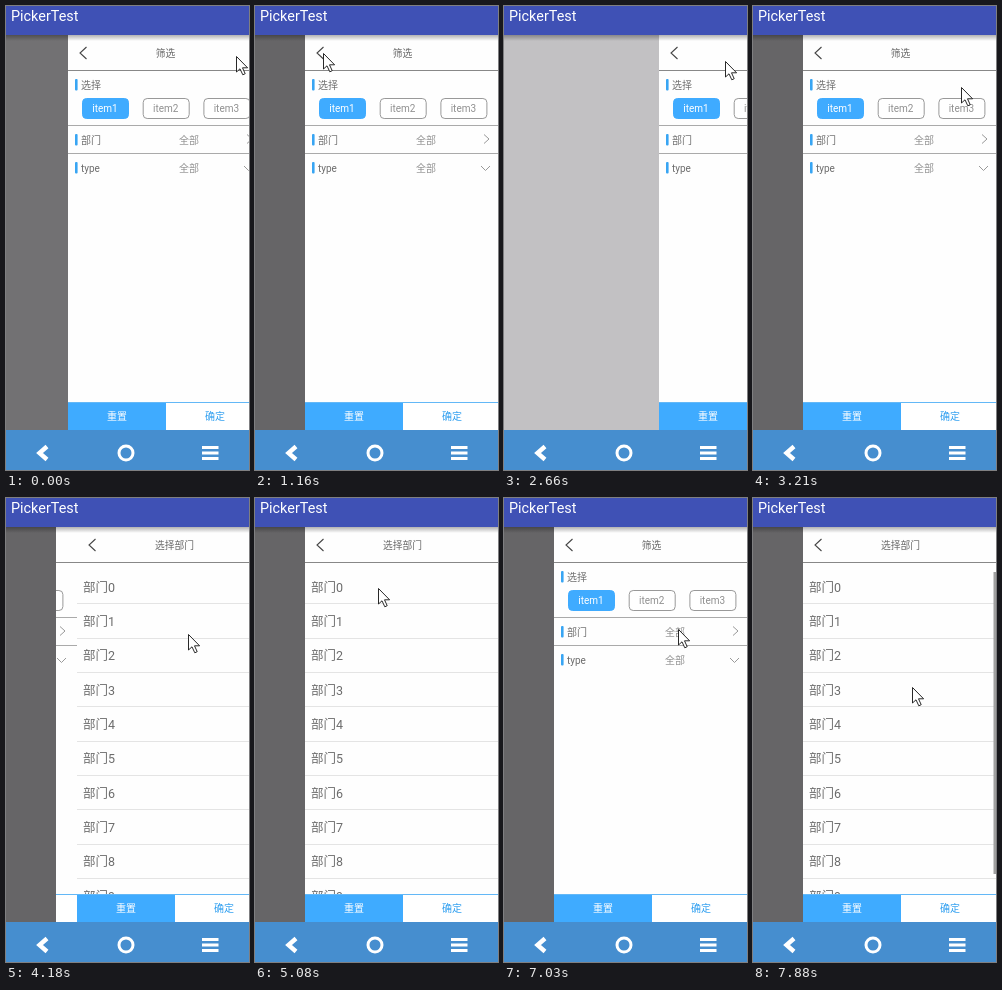
Recreate the animation shown at these times as an HTML page. Size 243 by 464 pixels, loop 8000 ms.

```html
<!DOCTYPE html>
<html lang="zh">
<head>
<meta charset="utf-8">
<title>Filter drawer</title>
<style>
  html, body { margin: 0; width: 100%; height: 100%; overflow: hidden; }
  #stage { display: block; width: 243px; height: 464px; }
  text { font-family: Roboto, "Noto Sans CJK SC", "Noto Sans CJK", sans-serif; }
</style>
</head>
<body>
<svg id="stage" viewBox="0 0 243 464">
  <defs>
    <linearGradient id="shade" x2="0" y2="1">
      <stop offset="0" stop-opacity=".3"/>
      <stop offset="1" stop-opacity="0"/>
    </linearGradient>
  </defs>
  <rect id="backdrop" y="29" width="243" height="395"/>
  <svg id="drawer" y="29" width="196" height="395" viewBox="0 29 196 395">
    <rect y="29" width="196" height="395" fill="#fefefe"/>
    <g id="filterPage"></g>
    <g id="listPage"></g>
  </svg>
  <rect y="29" width="243" height="6" fill="url(#shade)"/>
  <rect width="243" height="29" fill="#3f51b5"/>
  <text x="5" y="15" font-size="14.4" fill="#fff">PickerTest</text>
  <rect y="424" width="243" height="40" fill="#468ecf"/>
  <g fill="none" stroke="#fff">
    <path d="M41 440.5L33.5 447L41 453.5" stroke-width="4.4"/>
    <circle cx="120" cy="447" r="7" stroke-width="3"/>
    <path d="M196 441.5h16.5M196 447h16.5M196 452.5h16.5" stroke-width="3"/>
  </g>
  <path id="cursor" d="M.5 .5V16L4 12.8L6.8 18.8L9.2 17.7L6.5 11.8H11.6Z" fill="#fff" stroke="#111" stroke-width=".9"/>
</svg>
<script>
const $ = id => document.getElementById(id);
const BLUE = '#3fabff', PAGE = 196, SCREEN = 246, LOOP = 8000;

const label = (text, x, y, size, fill, anchor = 'start') =>
  `<text x="${x}" y="${y + size * .37}" font-size="${size}" fill="${fill}" text-anchor="${anchor}">${text}</text>`;
const stroke = (d, color, width = 1) =>
  `<path d="${d}" fill="none" stroke="${color}" stroke-width="${width}"/>`;
const rule = (y, color) => stroke(`M0 ${y}H${PAGE}`, color);

const frame = title => `
  <rect y="29" width="${PAGE}" height="35" fill="#fefefe"/>
  ${stroke('M18.5 41L12 47L18.5 53', '#444', 1.1)}
  ${label(title, 97.5, 47, 9.75, '#666', 'middle')}
  ${rule(64.5, '#888')}
  <rect y="396" width="${PAGE}" height="28" fill="#fff"/>
  <rect y="396" width="${PAGE / 2}" height="28" fill="${BLUE}"/>
  ${rule(396.5, '#63b8f7')}
  ${label('重置', PAGE / 4, 410, 10, '#fff', 'middle')}
  ${label('确定', PAGE * 3 / 4, 410, 10, '#2f9ff0', 'middle')}`;

const heading = (text, y) =>
  `<rect x="7" y="${y - 6}" width="2.6" height="11.5" rx="1" fill="#38a5f3"/>` +
  label(text, 13, y, 10, '#6c6c6c');

const chip = (text, i) => `
  <rect x="${14.5 + i * 60.7}" y="92.5" width="46" height="20" rx="4"
    fill="${i ? '#fff' : BLUE}" stroke="${i ? '#999' : BLUE}"/>
  ${label(text, 37 + i * 60.7, 102.5, 10, i ? '#909090' : '#fff', 'middle')}`;

$('filterPage').innerHTML = frame('筛选') +
  heading('选择', 79) + ['item1', 'item2', 'item3'].map(chip).join('') + rule(119.5, '#aaa') +
  heading('部门', 134) + label('全部', 111, 134, 10, '#909090') +
  stroke('M179 128.5L184 133L179 137.5', '#999') + rule(147.5, '#aaa') +
  heading('type', 162) + label('全部', 111, 162, 10, '#909090') +
  stroke('M176 160L180.5 164.5L185 160', '#999');

const rows = Array.from({ length: 10 }, (_, i) =>
  label('部门' + i, 6, 89 + i * 34.35, 12.5, '#6c6c6c') +
  rule(Math.round(105.3 + i * 34.35) + .5, '#e4e4e4')).join('');
$('listPage').innerHTML =
  `<rect y="29" width="${PAGE}" height="395" fill="#fefefe"/>${rows}${frame('选择部门')}
  <rect id="scrollbar" x="190.5" y="74" width="2.5" height="302" fill="#a0a0a0"/>`;

// Each burst of activity refreshes the picture in even steps.
const bursts = [0, 1560, 2350, 2660, 3910, 4960, 5930, 7030], STEP = 120;
const sample = time => {
  const start = bursts.findLast(b => b <= time);
  return start + Math.floor((time - start) / STEP) * STEP;
};

// Pointer stops: time, x, y.
const stops = [[0, 230, 50], [1160, 66, 47], [1560, 66, 48], [1680, 85, 58], [2070, 222, 49],
  [2660, 221, 55], [3910, 181, 134], [4150, 182, 136], [5930, 71, 49], [7030, 174, 131], [7870, 159, 189]];

const part = (t, start, length) => Math.min(1, Math.max(0, (t - start) / length));
const settle = (t, start) => 1 - (1 - part(t, start, 433)) ** 5;
const slide = (t, start) => (1 - Math.cos(Math.PI * part(t, start, 400))) / 2;

function pointerAt(t) {
  const i = Math.min(stops.findLastIndex(s => s[0] <= t), stops.length - 2);
  const [from, x, y] = stops[i], [to, x2, y2] = stops[i + 1];
  const u = part(t, from, to - from), k = u * u * (3 - 2 * u);
  return [x + (x2 - x) * k, y + (y2 - y) * k].map(Math.round);
}

function draw(time) {
  const t = sample(time);
  const open = settle(t, -185) - settle(t, 1519) + settle(t, 2609);
  const list = slide(t, 3835) - slide(t, 5835) + slide(t, 7100);
  const listX = Math.round(PAGE * (1 - list));
  const gray = Math.round(237 - 135 * Math.max(0, open) ** 1.5);
  const barShown = [4235, 7500].some(start => t >= start && t < start + 720);

  $('backdrop').setAttribute('fill', `rgb(${gray},${gray - 1},${gray + 1})`);
  $('drawer').setAttribute('x', Math.round(SCREEN - PAGE * open));
  $('filterPage').setAttribute('transform', `translate(${listX - PAGE})`);
  $('listPage').setAttribute('transform', `translate(${listX})`);
  $('scrollbar').setAttribute('opacity', barShown ? 1 : 0);
  $('cursor').setAttribute('transform', `translate(${pointerAt(t)})`);
}

const begin = performance.now();
function tick() {
  draw((performance.now() - begin) % LOOP);
  requestAnimationFrame(tick);
}
tick();
</script>
</body>
</html>
```
